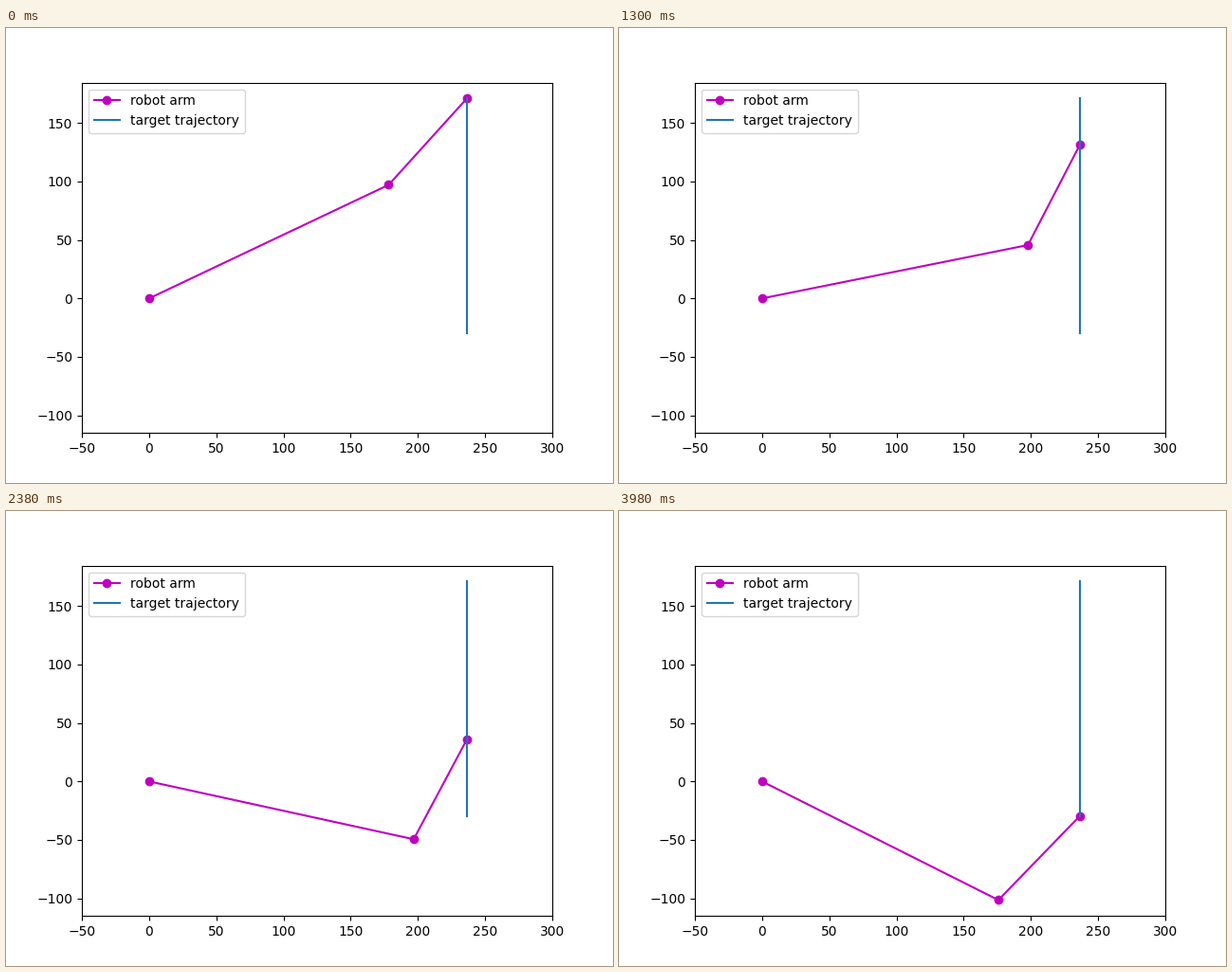
A matplotlib script for the animation above (4000 ms loop, 640 by 480 pixels).

```python
import numpy as np
import matplotlib.pyplot as plt
from matplotlib.animation import FuncAnimation

FRAMES, INTERVAL = 200, 20
L1, L2 = 203.0, 94.0
X, Y_START, Y_END = 236.4, 171.0, -29.6


def min_jerk(t):
    return 10 * t**3 - 15 * t**4 + 6 * t**5


def elbow(x, y):
    """Elbow position of the two-link arm reaching (x, y)."""
    r = np.hypot(x, y)
    bend = np.arccos((L1**2 + r**2 - L2**2) / (2 * L1 * r))
    angle = np.arctan2(y, x) - bend
    return L1 * np.cos(angle), L1 * np.sin(angle)


tip_y = Y_START + (Y_END - Y_START) * min_jerk(np.arange(FRAMES) / FRAMES)
elbow_x, elbow_y = elbow(X, tip_y)


def pose(i):
    return [0, elbow_x[i], X], [0, elbow_y[i], tip_y[i]]


fig, ax = plt.subplots(figsize=(6.4, 4.8), dpi=100)
arm, = ax.plot(*pose(0), "mo-", label="robot arm")
ax.plot([X, X], [Y_START, Y_END], color="C0", label="target trajectory")

low, high = elbow_y.min(), tip_y.max()
pad = 0.05 * (high - low)
ax.set_xlim(-50, 300)
ax.set_ylim(low - pad, high + pad)
ax.legend(loc="upper left")


def update(i):
    arm.set_data(*pose(i))
    return arm,


anim = FuncAnimation(fig, update, frames=FRAMES, interval=INTERVAL,
                     repeat=True, repeat_delay=0, blit=False)
plt.show()
```
